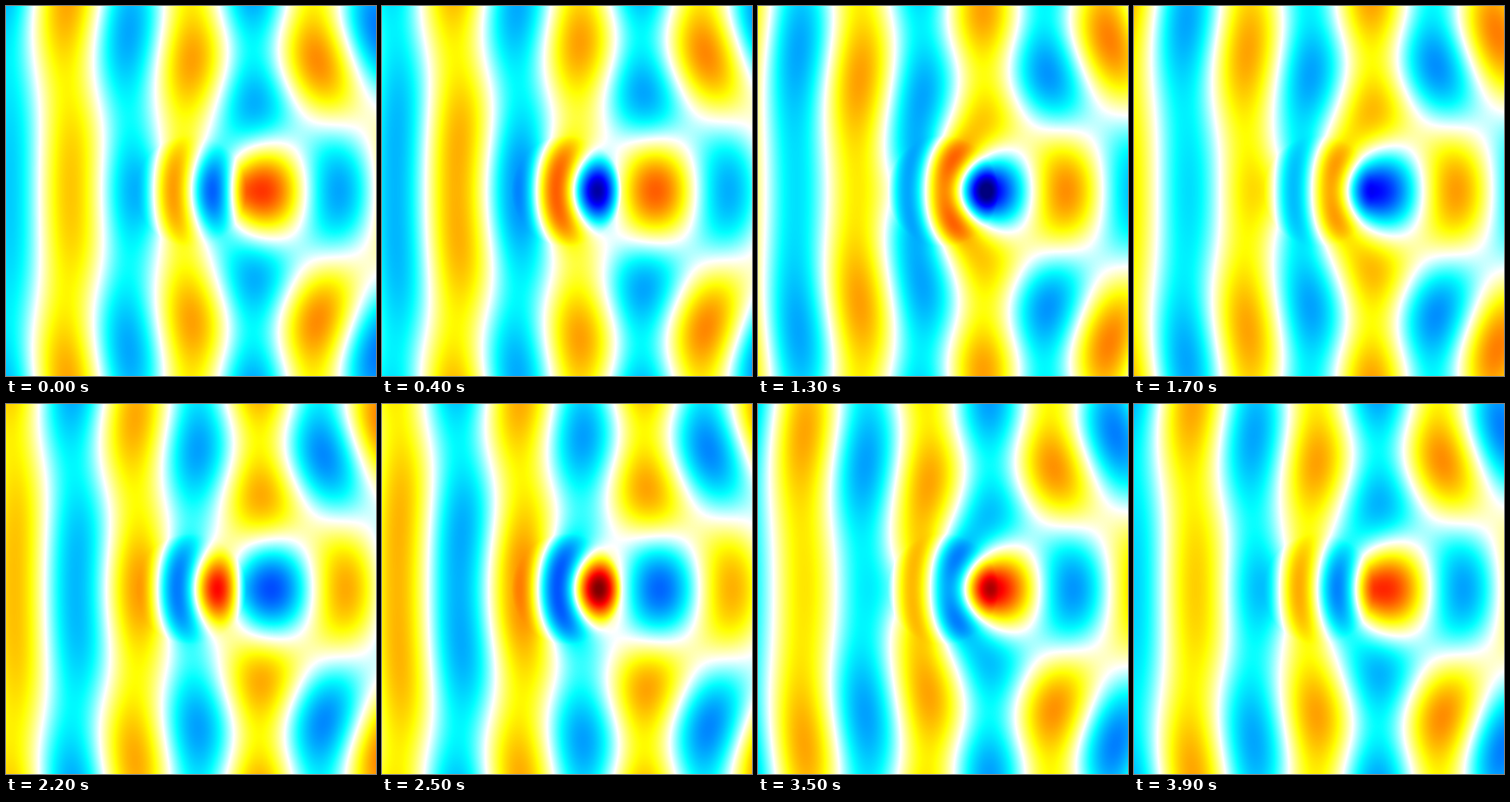
Recreate the animation shown at these times as a matplotlib script. Size 400 px wide and 400 px high, loop 4000 ms.

```python
import numpy as np
import matplotlib.pyplot as plt
from matplotlib.animation import FuncAnimation
from matplotlib.colors import LinearSegmentedColormap

SIZE = 400
FRAMES = 40
WAVELENGTH = 400 / 3
RADIUS = 60
INDEX = 1.65
ORDERS = 12
PEAK = 2.9


def bessel_j(n, x):
    t = (np.arange(64) + 0.5) * np.pi / 64
    x = np.asarray(x, float)
    return np.mean(np.cos(n * t - x[..., None] * np.sin(t)), axis=-1)


def bessel_y(count, x):
    """Y_0 .. Y_count-1 from Neumann series and upward recurrence."""
    x = np.asarray(x, float)
    j = [bessel_j(n, x) for n in range(42)]
    log = np.log(x / 2) + np.euler_gamma
    y0 = 2 / np.pi * log * j[0]
    y1 = 2 / np.pi * (log * j[1] - j[0] / x)
    for k in range(1, 20):
        sign = (-1) ** k
        y0 = y0 - 4 / np.pi * sign * j[2 * k] / k
        y1 = y1 + 2 / np.pi * sign * (j[2 * k - 1] - j[2 * k + 1]) / k
    y = [y0, y1]
    for n in range(1, count - 1):
        y.append(2 * n / x * y[n] - y[n - 1])
    return y


def slope(f, n, x):
    return n / x * f[n] - f[n + 1]


def scattered_field():
    """Complex amplitude of a plane wave meeting a dielectric cylinder."""
    k = 2 * np.pi / WAVELENGTH
    axis = np.arange(SIZE) + 0.5 - SIZE / 2
    x, y = np.meshgrid(axis, axis[:SIZE // 2])
    r, phi = np.hypot(x, y), np.arctan2(y, x)
    inside = r < RADIUS
    outer = k * np.where(inside, RADIUS, r)
    inner = k * INDEX * np.where(inside, r, RADIUS)

    a, b = k * RADIUS, k * RADIUS * INDEX
    ja = [bessel_j(n, a) for n in range(ORDERS + 1)]
    jb = [bessel_j(n, b) for n in range(ORDERS + 1)]
    ya = bessel_y(ORDERS + 1, a)
    ha = [j + 1j * y for j, y in zip(ja, ya)]
    y_out = bessel_y(ORDERS, outer)

    field = np.where(inside, 0, np.exp(1j * k * x))
    for n in range(ORDERS):
        dj, dh = slope(ja, n, a), slope(ha, n, a)
        db = slope(jb, n, b) / INDEX
        scatter = (ja[n] * db - dj * jb[n]) / (dh * jb[n] - ha[n] * db)
        core = (ja[n] + scatter * ha[n]) / jb[n]
        hankel = bessel_j(n, outer) + 1j * y_out[n]
        radial = np.where(inside, core * bessel_j(n, inner), scatter * hankel)
        field = field + (1 if n == 0 else 2) * 1j ** n * radial * np.cos(n * phi)
    return np.vstack([field, field[::-1]])


# Jet with its green middle replaced by white.
cmap = LinearSegmentedColormap.from_list("wave", [
    (0, (0, 0, 0.5)), (1 / 8, (0, 0, 1)), (3 / 8, (0, 1, 1)),
    (1 / 2, (1, 1, 1)),
    (5 / 8, (1, 1, 0)), (7 / 8, (1, 0, 0)), (1, (0.5, 0, 0))], N=512)

field = scattered_field()
fig = plt.figure(figsize=(4, 4), dpi=100)
ax = fig.add_axes([0, 0, 1, 1])
ax.axis("off")
image = ax.imshow(field.real, cmap=cmap, vmin=-PEAK, vmax=PEAK,
                  interpolation="nearest", aspect="auto")


def draw(frame):
    image.set_data((field * np.exp(-2j * np.pi * frame / FRAMES)).real)
    return [image]


anim = FuncAnimation(fig, draw, frames=FRAMES, interval=100,
                     repeat=True, repeat_delay=0)
plt.show()
```
